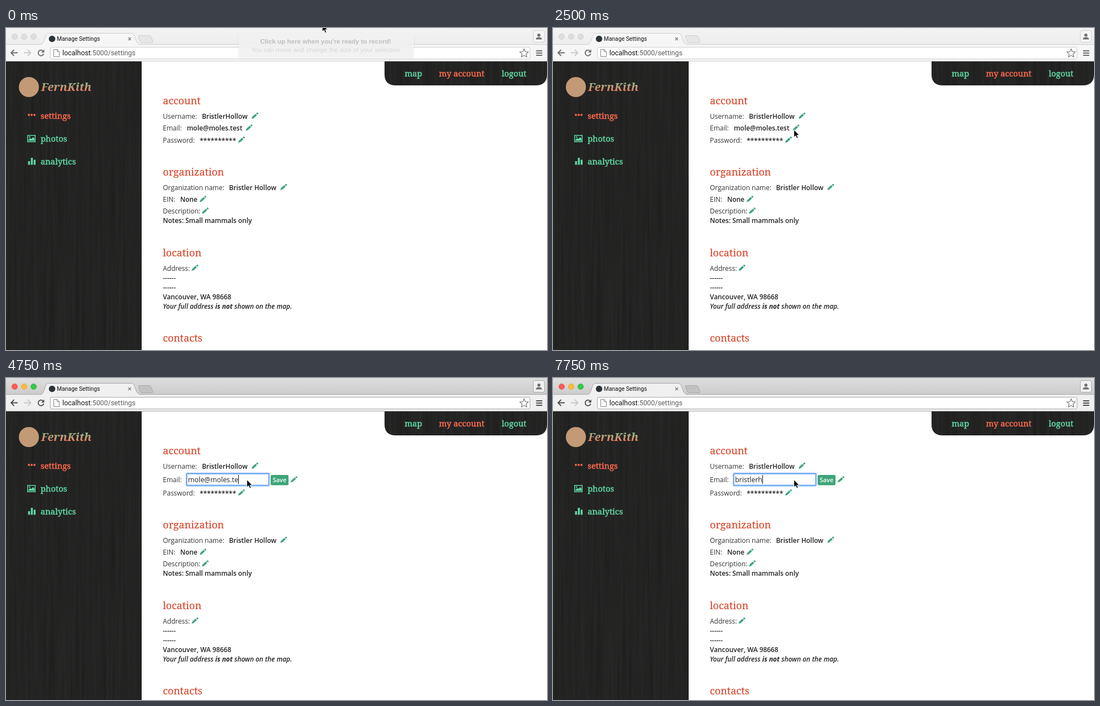
Animation, 969 px wide and 578 px high, one loop 8 s. Source, as an HTML page:

```html
<!DOCTYPE html>
<html lang="en">
<head>
<meta charset="utf-8">
<title>Manage Settings</title>
<style>
  html, body { margin: 0; width: 100%; height: 100%; overflow: hidden; background: #fff; }
  svg { display: block; width: 969px; height: 578px;
    --strip-top: #f3f3f3; --strip-end: #ededed; --bar: #f6f6f6; --line: #cfcfcf; --icon: #6b6b6b; --plus: #e6e6e6; }
  svg.active { --strip-top: #dedede; --strip-end: #cbcbcb; --bar: #f0f0f0; --line: #a9a9a9; --icon: #4d4d4d; --plus: #c2c2c2; }
  .light { fill: #dedede; stroke: #cbcbcb; stroke-width: .8; }
  .active .red { fill: #fc5b57; stroke: #e2443f; }
  .active .amber { fill: #fdbb3d; stroke: #dfa023; }
  .active .lime { fill: #34c84a; stroke: #27aa35; }
  text { font: 12px "Open Sans", sans-serif; fill: #333; white-space: pre; }
  .val { font-weight: 600; font-size: 11.9px; fill: #222; }
  .em { font-style: italic; }
  .bold { font-weight: 700; }
  .head { font: 18px "Noto Serif", serif; fill: #d9482f; stroke: #d9482f; stroke-width: .2px; }
  .menu { font: 14.8px "Noto Serif", serif; fill: #5fd6a3; stroke: #5fd6a3; stroke-width: .5px; }
  .menu.on { fill: #fb6a4c; stroke: #fb6a4c; }
  .tab { font: 10.3px Roboto, sans-serif; fill: #111; }
  .url { font: 12.4px Roboto, sans-serif; fill: #5c5c5c; }
  .tip { font: 11.6px "Liberation Sans", Arial, sans-serif; fill: #d6d6d6; text-anchor: middle; }
  .tip.strong { font-weight: 700; fill: #bdbdbd; }
  .brand { font: italic 600 20px "Noto Serif", serif; fill: url(#dusk); }
  #typed { font-size: 12.4px; fill: #222; }
  .save { font-size: 11px; font-weight: 600; fill: #fff; text-anchor: middle; }
  .pen { fill: #3da67b; }
  .ico { fill: none; stroke: var(--icon); stroke-width: 1.8; }
</style>
</head>
<body>
<svg id="stage" viewBox="0 0 969 578">
  <defs>
    <linearGradient id="strip" x2="0" y2="1">
      <stop style="stop-color:var(--strip-top)"/><stop offset="1" style="stop-color:var(--strip-end)"/>
    </linearGradient>
    <linearGradient id="dusk" x2="0" y2="1">
      <stop offset=".2" stop-color="#8dbd92"/><stop offset=".8" stop-color="#ee7d5d"/>
    </linearGradient>
    <filter id="wood" x="0" y="0" width="1" height="1" color-interpolation-filters="sRGB">
      <feTurbulence type="fractalNoise" baseFrequency=".2 .005" numOctaves="2" seed="7" result="streaks"/>
      <feTurbulence type="fractalNoise" baseFrequency=".8" numOctaves="2" seed="3"/>
      <feComposite in2="streaks" operator="arithmetic" k2=".5" k3=".5"/>
      <feColorMatrix values=".1 0 0 0 .088  .1 0 0 0 .088  .1 0 0 0 .086  0 0 0 0 1"/>
      <feComposite in2="SourceGraphic" operator="in"/>
    </filter>
    <filter id="soft" x="-10%" y="-30%" width="120%" height="170%"><feGaussianBlur stdDeviation="2"/></filter>
    <g id="pencil" class="pen">
      <path d="M-6 5.5l.9-3.4 6-5.6 2.6 2.5-6 5.6z"/>
      <path d="M1.8-4.3l1.5-1.3q.6-.4 1.2 0l1.2 1.2q.5.6 0 1.1l-1.4 1.3z"/>
    </g>
  </defs>

  <rect width="969" height="578" fill="#fff"/>

  <!-- browser frame -->
  <rect width="969" height="31" fill="url(#strip)"/>
  <rect y="30" width="969" height="30" style="fill:var(--bar)"/>
  <path d="M0 29.5H969M0 59.5H969" style="stroke:var(--line)"/>
  <path d="M61 30.5C66 29 67 26 69 20S72 9.500 77 9.500H224C229 9.500 230 14 232 20S236 29 241 30.500Z" style="fill:var(--bar)"/>
  <path d="M61 29.5C66 29 67 26 69 20S72 9.500 77 9.500H224C229 9.500 230 14 232 20S236 29 241 29.500" fill="none" style="stroke:var(--line)"/>
  <path d="M239 13.500H256Q259 13.500 260 16L263 24Q264 26.500 261 26.500H244Q241.500 26.500 240.500 24L237.500 16Q236.500 13.500 239 13.500Z" style="fill:var(--plus);stroke:var(--line)"/>
  <circle class="light red" cx="15.500" cy="15.500" r="5"/>
  <circle class="light amber" cx="32.500" cy="15.500" r="5"/>
  <circle class="light lime" cx="49.500" cy="15.500" r="5"/>
  <circle cx="82.500" cy="19.500" r="5.800" fill="#2c3438"/>
  <text class="tab" x="91" y="23.300">Manage Settings</text>
  <path d="M219 17l5 5m0-5l-5 5" stroke="#777" stroke-width="1.200"/>
  <rect x="944.500" y="4.500" width="20" height="21" rx="2.500" style="fill:var(--bar);stroke:var(--line)"/>
  <path d="M949 20.500q0-4 5.500-4t5.500 4z" fill="#707070"/><circle cx="954.500" cy="12.800" r="2.800" fill="#707070"/>
  <path class="ico" d="M21 44.500H9.500M14.500 39l-5.500 5.500 5.500 5.500"/>
  <path class="ico" d="M32 44.500H44M39 39l5.500 5.500-5.500 5.500" style="stroke:#c9c9c9"/>
  <path class="ico" d="M66.500 41.500A5 5 0 1 0 67.500 46"/><path d="M68.500 38.500V44H63z" style="fill:var(--icon)"/>
  <rect x="79.500" y="34.500" width="859" height="21" rx="2.500" fill="#fff" style="stroke:var(--line)"/>
  <path d="M85.500 38.500H91.500L95.500 42.500V51.500H85.500ZM91.500 38.500V42.500H95.500" fill="#fff" stroke="#858585"/>
  <text class="url" x="101" y="49.400"><tspan fill="#111">localhost</tspan>:5000/settings</text>
  <path d="M928 37.500l2.200 5 5.300.5-4 3.600 1.200 5.300-4.700-2.800-4.700 2.800 1.200-5.300-4-3.600 5.300-.5z" fill="none" stroke="#757575" stroke-width="1.200"/>
  <path d="M949.500 41H960.500M949.500 45H960.500M949.500 49H960.500" style="stroke:var(--icon)" stroke-width="2.200"/>

  <!-- site navigation -->
  <rect y="60" width="243" height="518" filter="url(#wood)"/>
  <path d="M678 60H969V83Q969 103 949 103H698Q678 103 678 83Z" filter="url(#wood)"/>
  <circle cx="41" cy="106" r="18" fill="#c39a76"/>
  <text class="brand" x="63" y="113">FernKith</text>
  <g fill="#fb6a4c"><circle cx="41" cy="156" r="1.900"/><circle cx="46" cy="156" r="1.900"/><circle cx="51" cy="156" r="1.900"/></g>
  <g fill="#5fd6a3">
    <path fill-rule="evenodd" d="M38 192H53V205H38ZM39.500 193.500V203.500H51.500V193.500Z"/>
    <path d="M40.500 202.500V200L43.500 197.500 45.500 199.300 48.500 195.800 51 198.500V202.500Z"/><circle cx="42.300" cy="195.800" r="1.300"/>
    <path d="M39.500 239H43V245.500H39.500ZM44.500 233H48V245.500H44.500ZM49.500 236.500H53V245.500H49.500Z"/>
  </g>
  <text class="menu on" x="62" y="163">settings</text>
  <text class="menu" x="62" y="204">photos</text>
  <text class="menu" x="62" y="245">analytics</text>
  <text class="menu" x="714" y="87">map</text>
  <text class="menu on" x="775.500" y="87">my account</text>
  <text class="menu" x="888" y="87">logout</text>

  <!-- settings page -->
  <text class="head" x="281" y="137">account</text>
  <text x="281" y="162.500">Username:</text>
  <text class="val" x="351" y="162.500">BristlerHollow</text>
  <use href="#pencil" x="446" y="157.500"/>
  <g id="view">
    <text x="281" y="184">Email:</text>
    <text class="val" x="324" y="184">mole@moles.test</text>
    <use href="#pencil" x="435.500" y="179"/>
  </g>
  <g id="edit">
    <text x="281" y="186.500">Email:</text>
    <rect x="323.500" y="171.500" width="147.500" height="21.500" rx="1.500" fill="#fff" stroke="#7db0f3" stroke-width="2.800"/>
    <text id="typed" x="326" y="186.500"></text>
    <rect id="caret" y="174" width="1" height="16" fill="#111"/>
    <rect x="474" y="174" width="32" height="18.500" rx="2.500" fill="#3fa57b"/>
    <text class="save" x="490" y="187">Save</text>
    <use href="#pencil" x="516" y="182"/>
  </g>
  <g id="below">
    <text x="281" y="205.500">Password:</text>
    <text class="val" x="347" y="206.500">**********</text>
    <use href="#pencil" x="422" y="200.500"/>
    <text class="head" x="281" y="265">organization</text>
    <text x="281" y="290.500">Organization name:</text>
    <text class="val" x="399.500" y="290.500">Bristler Hollow</text>
    <use href="#pencil" x="497.500" y="285.500"/>
    <text x="281" y="312">EIN:</text>
    <text class="val" x="312" y="312">None</text>
    <use href="#pencil" x="353" y="307"/>
    <text x="281" y="333">Description:</text>
    <use href="#pencil" x="357" y="328"/>
    <text class="val" x="281" y="350.300">Notes: Small mammals only</text>
    <text class="head" x="281" y="410">location</text>
    <text x="281" y="435.500">Address:</text>
    <use href="#pencil" x="338.500" y="430.500"/>
    <text class="val" x="281" y="452.500">------</text>
    <text class="val" x="281" y="469.500">------</text>
    <text class="val" x="281" y="486.500">Vancouver, WA 98668</text>
    <text class="val em" x="281" y="503.500">Your full address <tspan class="bold">is not</tspan> shown on the map.</text>
    <text class="head" x="281" y="563">contacts</text>
  </g>

  <g id="hint">
    <rect x="417" y="12" width="313" height="42" rx="4" fill="#000" opacity=".07" filter="url(#soft)"/>
    <rect x="417" y="10" width="313" height="43" rx="4" fill="#f3f3f3" opacity=".9"/>
    <text class="tip strong" x="572.500" y="28">Click up here when you're ready to record!</text>
    <text class="tip" x="572.500" y="42.500">You can move and change the size of your selection</text>
  </g>

  <path id="cursor" d="M0 0V13.500L3.100 10.700 5.300 15.700 7.500 14.700 5.400 9.900H9.400Z" fill="#000" stroke="#fff" stroke-width=".9"/>
</svg>
<script>
const LOOP = 8000, HINT_END = 250, ACTIVE = 2750, EDIT = 3500, FIELD_X = 326;

// [time, x, y] of the pointer tip
const moves = [
  [0, 566.5, -7], [750, 565, -3], [1000, 543, 73], [1250, 488.5, 164], [1500, 472, 181],
  [1750, 453, 187], [2000, 435, 188], [2250, 431, 184], [2500, 431.5, 182.5]
];
const mail = "mole@moles.test", name = "bristlerhollow";
// [time, word, letters shown, caret visible]
const typing = [
  [3500, mail, 15, 1], [4000, mail, 15, 0], [4500, mail, 15, 1], [4750, mail, 13, 1],
  [5250, mail, 11, 1], [5500, mail, 9, 1], [5750, mail, 5, 1], [6000, mail, 3, 1],
  [6250, mail, 0, 1], [6750, name, 2, 1], [7000, name, 4, 1], [7250, name, 6, 1],
  [7500, name, 8, 1], [7750, name, 9, 1]
];

const $ = id => document.getElementById(id);
const show = (id, on) => $(id).setAttribute("visibility", on ? "visible" : "hidden");
const stepAt = (steps, t) => steps.findLast(s => s[0] <= t) || steps[0];

function draw(t) {
  const editing = t >= EDIT;
  const [, x, y] = stepAt(moves, t);
  const [, word, count, blink] = stepAt(typing, t);

  $("stage").classList.toggle("active", t >= ACTIVE);
  show("hint", t < HINT_END);
  show("view", !editing);
  show("edit", editing);
  $("below").setAttribute("transform", `translate(0 ${editing ? 5 : 0})`);
  $("cursor").setAttribute("transform", `translate(${x} ${y})`);

  const typed = $("typed");
  typed.textContent = word.slice(0, count);
  const width = count ? typed.getComputedTextLength() : 0;
  $("caret").setAttribute("x", Math.round(FIELD_X + width));
  show("caret", editing && blink);
}

const start = performance.now();
function tick() {
  draw((performance.now() - start) % LOOP);
  requestAnimationFrame(tick);
}
tick();
</script>
</body>
</html>
```
